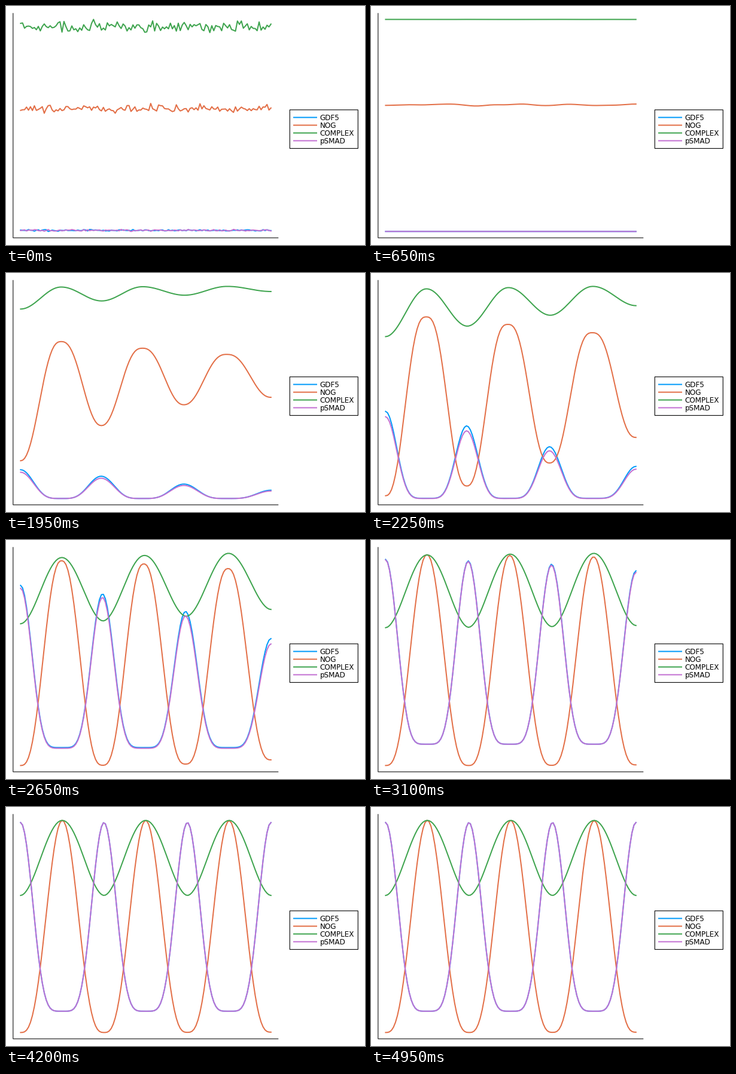
A matplotlib script for the animation above (5.05 s loop, 600 by 400 pixels).

```python
import numpy as np
import matplotlib.pyplot as plt
from matplotlib.animation import FuncAnimation

W, H, DPI = 600, 400, 100
PX = 72 / DPI                       # points per pixel
LEFT, RIGHT, TOP, BOTTOM = 24.4, 442.8, 22.4, 377.4
POINTS = 128
FRAMES, INTERVAL = 101, 50

SERIES = [("GDF5", "#009AFA"), ("NOG", "#E36F47"),
          ("COMPLEX", "#3EA44E"), ("pSMAD", "#C371D2")]

x = np.linspace(LEFT, RIGHT, POINTS)
node_u = np.linspace(0, 1, 7)       # crests and troughs of three waves
NOG_REST = 0.5975

rng = np.random.default_rng(12)
modes = np.arange(5, POINTS)
cosines = np.cos(np.pi * np.outer(np.linspace(0, 1, POINTS), modes))
coefs = np.sqrt(2 / POINTS) * rng.standard_normal((4, len(modes)))


def logistic(z):
    return 1 / (1 + np.exp(-z))


def mix(a, b, t):
    return a + (b - a) * t


def wave(even, odd, weight, n):
    """Join the node values; weight turns the cosine phase into a share of odd."""
    drift = 8 * logistic((43 - n) / 7) * np.sin(np.pi * node_u ** 1.2)
    t = np.interp(x, mix(LEFT, RIGHT, node_u) - drift, np.arange(7))
    i = np.minimum(t.astype(int), 5)
    share = weight(np.clip((1 - np.cos(np.pi * t)) / 2, 0, 1))
    return mix(even[i + i % 2], odd[i + 1 - i % 2], share)


def gdf(n, bump):
    # The pattern sets in on the left first, so growth lags with u.
    even = 0.99 * logistic(0.3 * (n - 38) - 0.34 - 1.35 * node_u ** 1.4)
    odd = np.full(7, 0.1 * logistic((n - 42.5) / 1.5))
    sharp = 1 + 1.5 * logistic(0.4 * (n - 33)) + 0.5 * bump
    return wave(even, odd, lambda b: 1 - (1 - b) ** sharp, n)


def nog(n, grown, bump):
    d = n - 38
    odds = np.exp(0.2 * d - 0.46) + np.exp(0.55 * d + 3.5 - 4.3 * node_u)
    even = NOG_REST / (1 + odds)
    odd = mix(NOG_REST, 1, logistic(0.235 * d + 0.75 - 1.1 * node_u))
    p, q = 1 + 0.5 * grown, 1 + 0.4 * bump
    return wave(even, odd, lambda b: 1 - (1 - b ** p) ** q, n)


def cpx(n, grown):
    even = 1 - 0.354 * logistic(0.31 * (n - 38) + 0.72 - 1.75 * node_u)
    odd = 1 - 0.03 * np.exp(-((n - 44) / 8) ** 2) * (1 - node_u)
    return wave(even, odd, lambda b: b ** (1 - 0.08 * grown), n + 5)


def noise(n, row, size, fade):
    """Random start values smoothed by diffusion; size in pixels."""
    decay = np.exp(-0.0005 * modes ** 2 * n - fade * n)
    return size / (BOTTOM - TOP) * (cosines @ (coefs[row] * decay))


def curves(n):
    grown = logistic(0.235 * (n - 38))
    bump = 4 * grown * (1 - grown)
    rows = np.array([
        gdf(n, bump) + noise(n, 0, 0.8, 0.25),
        nog(n, grown, bump) + noise(n, 1, 3.6, 0),
        cpx(n, grown) + noise(n, 2, 4.6, 0.25),
        gdf(n - 0.35, bump) + noise(n, 3, 0.8, 0.25),
    ])
    lo, hi = rows.min(), rows.max()
    return mix(BOTTOM, TOP, (rows - lo) / (hi - lo))


def step(k):
    """Simulation step on show; about every seventh picture is held."""
    return k - int(np.floor((k - 0.5) / 6.6)) - 1


fig = plt.figure(figsize=(W / DPI, H / DPI), dpi=DPI, facecolor="white")
ax = fig.add_axes([0, 0, 1, 1])
ax.set_xlim(0, W)
ax.set_ylim(H, 0)
ax.axis("off")


def stroke(xs, ys, color="black", width=1.2, **kw):
    return ax.plot(xs, ys, color=color, lw=width * PX, snap=False, **kw)[0]


stroke([11.8, 11.8, 455.3], [11.8, 388, 388], "#222222",
       solid_joinstyle="miter", solid_capstyle="butt")
ax.add_patch(plt.Rectangle((474.3, 173.8), 114, 64.6, fill=False,
                           ec="black", lw=1.1 * PX, snap=False))

lines = []
for row, (name, color) in enumerate(SERIES):
    y = 186.5 + 13 * row
    stroke([480, 520], [y, y], color, 2, solid_capstyle="butt")
    ax.text(524.5, y + 4.4, name, family="DejaVu Sans", size=12 * PX,
            color="black", va="baseline")
    lines.append(stroke(x, x, color, 2, solid_joinstyle="round"))


def draw(k):
    for line, y in zip(lines, curves(step(k))):
        line.set_ydata(y)
    return lines


anim = FuncAnimation(fig, draw, frames=FRAMES, interval=INTERVAL,
                     init_func=lambda: draw(0), repeat=True, repeat_delay=0,
                     blit=False)
plt.show()
```
